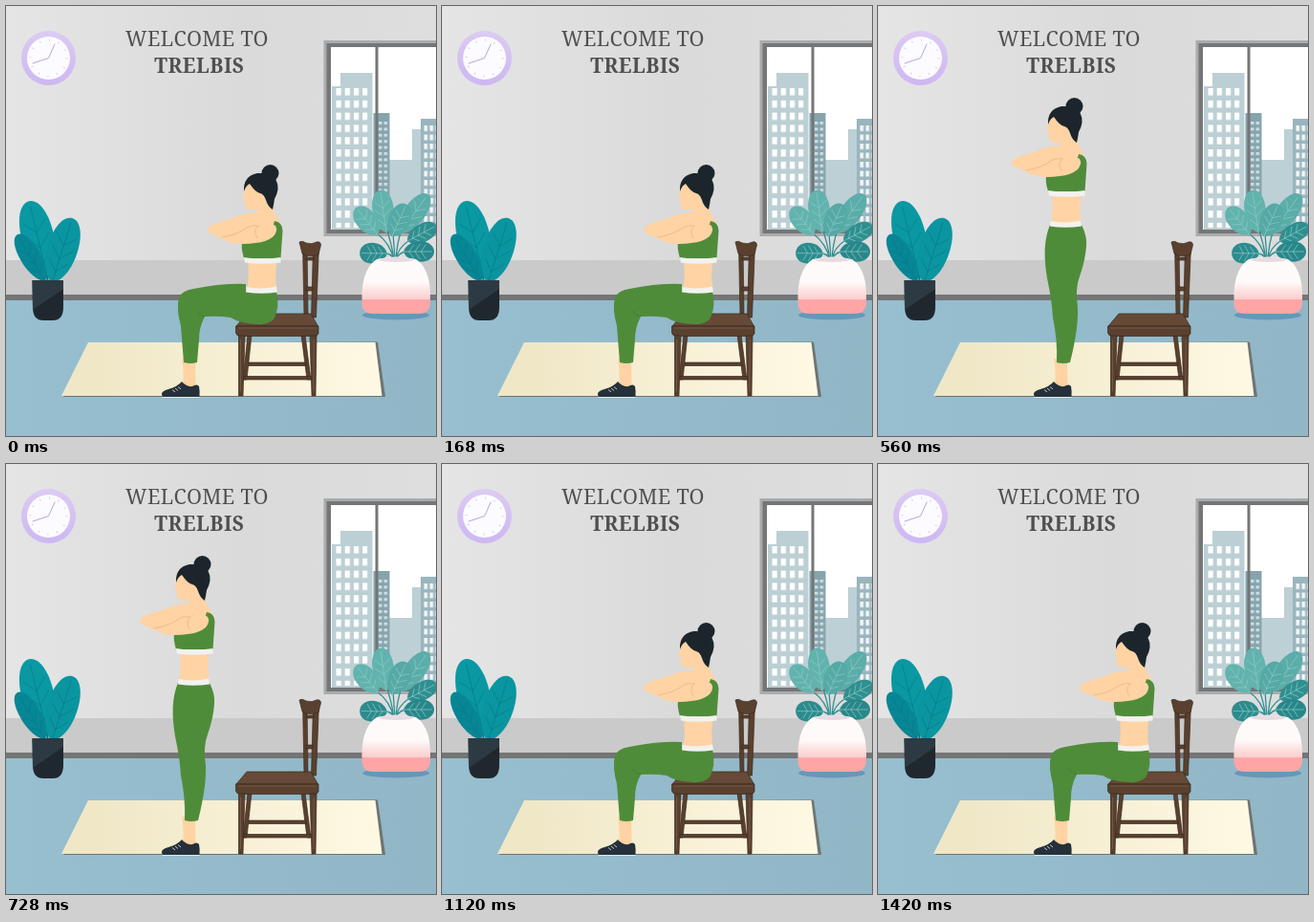
An HTML page without scripts for the animation above (1.62 s loop, 450 by 450 pixels).

```html
<!DOCTYPE html>
<html lang="en">
<head>
<meta charset="utf-8">
<title>Chair squat</title>
<style>
html, body { margin: 0; width: 100%; height: 100%; overflow: hidden; background: #dcdcdc; }
svg { display: block; width: 100vw; height: 100vh; }
text { font-family: "Noto Serif", serif; fill: #505052; text-anchor: middle; }
.pose { visibility: hidden; animation: 1620ms step-end infinite; }
.sit { animation-name: sit; }
.half { animation-name: half; }
.stand { animation-name: stand; }
@keyframes sit {
  0%, 69.136% { visibility: visible; }
  17.284%, 100% { visibility: hidden; }
}
@keyframes half {
  0%, 34.568%, 69.136%, 100% { visibility: hidden; }
  17.284%, 51.852% { visibility: visible; }
}
@keyframes stand {
  0%, 51.852%, 100% { visibility: hidden; }
  34.568% { visibility: visible; }
}
.legs { fill: #4f8c3a; }
.skin { fill: #ffd3a3; }
.hair { fill: #1b252b; }
.fold { fill: none; stroke: #eab584; stroke-width: .8; stroke-linecap: round; }
.crease { fill: none; stroke: #417a2f; stroke-width: .8; }
.wood { fill: #59402f; stroke: #3c2a1e; stroke-width: .7; }
.vein { fill: none; stroke-width: .7; stroke-linecap: round; vector-effect: non-scaling-stroke; }
</style>
</head>
<body>
<svg viewBox="0 0 450 450">
<defs>
  <linearGradient id="wall"><stop stop-color="#e5e5e5"/><stop offset=".55" stop-color="#dadada"/><stop offset="1" stop-color="#dedede"/></linearGradient>
  <linearGradient id="floor"><stop stop-color="#97bfd0"/><stop offset="1" stop-color="#91b6c6"/></linearGradient>
  <linearGradient id="mat"><stop offset=".1" stop-color="#efe7c6"/><stop offset="1" stop-color="#fff9e4"/></linearGradient>
  <linearGradient id="ring" x2="0" y2="1"><stop stop-color="#dccbf3"/><stop offset="1" stop-color="#cdb7f2"/></linearGradient>
  <linearGradient id="vase" x2="0" y2="1"><stop offset=".45" stop-color="#fffafa"/><stop offset=".55" stop-color="#fde8e8"/><stop offset=".74" stop-color="#fbcfcf"/><stop offset=".76" stop-color="#ffa5a6"/></linearGradient>
  <pattern id="panes" x="345.500" y="86" width="9.200" height="12.800" patternUnits="userSpaceOnUse"><rect width="5.200" height="7.500" fill="#fff"/></pattern>
  <pattern id="small" x="390" y="121" width="5.600" height="6.400" patternUnits="userSpaceOnUse"><rect width="3.400" height="3" fill="#d0dfe3"/></pattern>
  <pattern id="side" x="437.500" y="125" width="6" height="9.500" patternUnits="userSpaceOnUse"><rect width="3.600" height="6" fill="#f2f6f7"/></pattern>

  <path id="leaf" d="M0 0C-16 -10 -19 -40 -15 -60C-12 -74 -6 -80 0 -80C6 -80 12 -74 15 -60C19 -40 16 -10 0 0Z"/>
  <path id="veins" class="vein" d="M0 2V-74M0 -14L-10 -26M0 -14L10 -26M0 -30L-12 -43M0 -30L12 -43M0 -46L-11 -58M0 -46L11 -58"/>

  <g id="body">
    <path class="skin" d="M191 138L208 134Q207 147 216 155L196 168L187 157Q193 151 191 138Z"/>
    <path class="skin" d="M182 198H212.500Q210 211 212.500 227H181Q184 212 182 198Z"/>
    <path class="legs" d="M187 157Q192 166 201 165Q209 162 210 155Q218 156 218.500 165L216.500 194H178Q174 181 177 174Q185 168 187 157Z"/>
    <path fill="#f2f2ee" d="M178 193Q196 196 216.500 193V198.500Q196 201 179 198.500Z"/>
    <path class="skin" d="M180 112Q177 119 178.500 123L176.500 129L178.500 131.500L178.500 136Q179 142 184 143Q192 144 197 138L206 128L199 108L188 107Z"/>
    <circle class="hair" cx="205.500" cy="105" r="9"/>
    <path class="hair" d="M178 124Q177 108 192 105Q207 104 212 113Q216 121 210 132Q209 139 208 143Q203 140 201 133Q199 127 195 126Q190 125 184 116Q180 118 178 124Z"/>
  </g>
  <g id="arm">
    <path class="skin" d="M140 164Q141 160 147 158L166 152Q176 147 190 146Q194 147 190 152Q203 154 211 160Q214 165 209 171Q202 177 190 178Q170 181 158 175L143 168Q140 167 140 164Z"/>
    <path class="fold" d="M155 172Q172 169 181 162Q186 159 193 160M193 160Q187 165 192 173"/>
  </g>
  <path id="belt" fill="#f2f2ee" d="M180.500 225Q196 228 212 224.500L213 230.500Q196 233 180 230.500Z"/>
</defs>

<rect width="450" height="268" fill="url(#wall)"/>
<rect y="266" width="450" height="37" fill="#cacaca"/>
<rect y="302" width="450" height="6.500" fill="#747576"/>
<rect y="308" width="450" height="142" fill="url(#floor)"/>
<path fill="#6f7473" d="M90 353L389 351.500L397 409H60Z"/>
<path fill="url(#mat)" d="M86 352L386.500 352L393.500 408H58Z"/>

<circle cx="44.500" cy="54.500" r="28.500" fill="url(#ring)"/>
<circle cx="44.500" cy="54.500" r="22.500" fill="#fcfbff"/>
<circle cx="44.500" cy="54.500" r="19" fill="none" stroke="#cfc2e3" stroke-width="2.200" stroke-dasharray=".8 9.148"/>
<path d="M51 40L44.500 54.500L28 60" fill="none" stroke="#b9a5dc" stroke-linecap="round"/>

<text x="200" y="42" font-size="21.500" letter-spacing=".35">WELCOME TO</text>
<text x="202.500" y="69.500" font-size="21" letter-spacing=".5" font-weight="600">TRELBIS</text>

<g>
  <rect x="332.500" y="36" width="120" height="205" fill="#a9abac"/>
  <rect x="335.500" y="39" width="120" height="199" fill="#747677"/>
  <rect x="340" y="43" width="111" height="191" fill="#fff"/>
  <path fill="#bccfd4" d="M341 234V84H350V70H383.500V234Z"/>
  <rect x="345" y="86" width="33.500" height="146" fill="url(#panes)"/>
  <path fill="#bdd0d5" d="M401 234V161H425V129H437V234Z"/>
  <rect x="384.500" y="112" width="17" height="122" fill="#86a4ad"/>
  <rect x="390" y="121" width="10" height="110" fill="url(#small)"/>
  <rect x="434" y="118" width="16" height="116" fill="#9ab5bd"/>
  <rect x="437" y="124" width="13" height="108" fill="url(#side)"/>
  <rect x="386.500" y="40" width="3" height="197" fill="#747677"/>
</g>

<g stroke="#067a88">
  <path d="M44 290L41 270M46 290L51 268M41 290L34 276" stroke-width="2"/>
  <g fill="#0a98a3" transform="translate(43 282) rotate(-13.700) scale(1.020 1)"><use href="#leaf" stroke="none"/><use href="#veins"/></g>
  <g fill="#0a95a0" transform="translate(48 290) rotate(17.500) scale(.95 .89)"><use href="#leaf" stroke="none"/><use href="#veins"/></g>
  <g fill="#078695" transform="translate(41 288) rotate(-31) scale(.64 .71)"><use href="#leaf" stroke="none"/><use href="#veins"/></g>
</g>
<path id="pot" fill="#1f282e" d="M27.500 287H60V315Q60 329 49 329H39Q28 329 28 315Z"/>
<path fill="#2d3a43" d="M27.500 287H60V296L28 318Z"/>

<ellipse cx="408" cy="323.500" rx="35" ry="5" fill="#6697ba"/>
<g stroke="#8ccbc5">
  <path d="M406 266Q402 248 388 238M406 266Q403 245 398 234M407 266Q406 250 405 238M408 266Q409 248 414 234M408 266Q410 253 421 246M406 266Q404 259 397 259M408 266Q410 259 418 257" fill="none" stroke="#338f90" stroke-width="1.300"/>
  <g fill="#62b3ae" transform="translate(389 239) rotate(-39) scale(.65 .45)"><use href="#leaf" stroke="none"/><use href="#veins"/></g>
  <g fill="#62b3ae" transform="translate(398 237) rotate(-8) scale(.68 .56)"><use href="#leaf" stroke="none"/><use href="#veins"/></g>
  <g fill="#5badaa" transform="translate(412 238) rotate(36) scale(.66 .63)"><use href="#leaf" stroke="none"/><use href="#veins"/></g>
  <g fill="#55a9a6" transform="translate(404 241) rotate(24) scale(.68 .46)"><use href="#leaf" stroke="none"/><use href="#veins"/></g>
  <g fill="#2f8f90" transform="translate(420 246) rotate(62) scale(.58 .43)"><use href="#leaf" stroke="none"/><use href="#veins"/></g>
  <g fill="#2c8b8d" transform="translate(399 259) rotate(-89) scale(.66 .36)"><use href="#leaf" stroke="none"/><use href="#veins"/></g>
  <g fill="#28878a" transform="translate(416 257) rotate(90) scale(.65 .4)"><use href="#leaf" stroke="none"/><use href="#veins"/></g>
</g>
<path fill="url(#vase)" d="M388 265Q408 260 429 265Q443 274 444 300V312Q443 322 432 322H384Q373 322 372.500 312V300Q374 274 388 265Z"/>
<ellipse cx="408.500" cy="265.500" rx="18" ry="2.500" fill="#e6dbe2"/>

<g class="wood">
  <path d="M253 344H257L252 391H248ZM309 344H313L319 391H315Z"/>
  <path d="M254 373H314V376.500H254ZM249 387.500H320V391H249Z"/>
  <path d="M310.500 250H315L316 323H312ZM321.500 250H327.500L324.500 326H319.500Z"/>
  <path d="M314 263H322V266H314ZM314 294H321V298H314Z"/>
  <path d="M307 247Q310 245 314 248Q320 250 325 247Q329 246 329.500 250L327 260Q318 264 310 259Z"/>
  <path fill="#664a37" d="M252 322H319L326.500 335H241Z"/>
  <path d="M240.500 335H327V343Q326 345.500 322 345.500H245Q241 345 240.500 342Z"/>
  <path d="M243.500 345H250L248 408H243.500ZM318 345H325L324 408H320Z"/>
  <path fill="none" stroke="#846450" d="M243 337H325M245.500 349V403M322 349V403"/>
</g>

<path class="skin" d="M184 369H198L198.500 400H184.500Q187 388 184 369Z"/>
<path fill="#25303a" d="M163 406Q163 403 170 401Q180 398 184 393Q189 399 195 398Q200 395 202 398Q203 403 202.500 409H165Q163 409 163 406Z"/>
<path d="M163.500 409.500H202.500" fill="none" stroke="#dfe8e8"/>
<path d="M174 401.500L177 404M177 400L180 402.500M180 398.500L183 401" stroke="#e9ecee" stroke-width=".8"/>

<g class="pose sit">
  <g transform="translate(71 70)"><use href="#body"/><use href="#arm"/></g>
  <path class="legs" d="M251 296L283 298Q287 316 280 328Q274 334 262 333Q244 332 235 326Q222 324 208 325Q202 336 202 349L200 373Q193 375 186 373L183 335Q178 317 181 305Q184 298 196 296Q226 290 251 291Z"/>
  <path class="crease" d="M208 325Q204 325 199 319"/>
  <use href="#belt" transform="translate(71 69)"/>
</g>

<g class="pose half">
  <g transform="translate(37 43) rotate(-9.800 196 227)"><use href="#body"/><use href="#arm" x="1" y="5.500"/></g>
  <path class="legs" d="M219 275L250 270Q258 279 258.500 290Q257 303 247 307Q220 311 192 323Q191 327 194 338Q198 356 196.500 373Q189 376 182 373Q177 352 166 333Q158 319 159.500 311Q163 303 176 295Q195 283 219 275Z"/>
  <path class="crease" d="M192 323Q188 323 184 319"/>
  <use href="#belt" transform="translate(37 43.500) rotate(-9.800 196 227)"/>
</g>

<g class="pose stand">
  <use href="#body"/><use href="#arm"/>
  <path class="legs" d="M180 229H213Q219 241 218 251Q217 266 211 283Q206 296 209 316Q210 337 201 373Q194 375 187 373Q188 350 183 326Q182 308 177 285Q171 250 180 229Z"/>
  <use href="#belt"/>
</g>
</svg>
</body>
</html>
```
